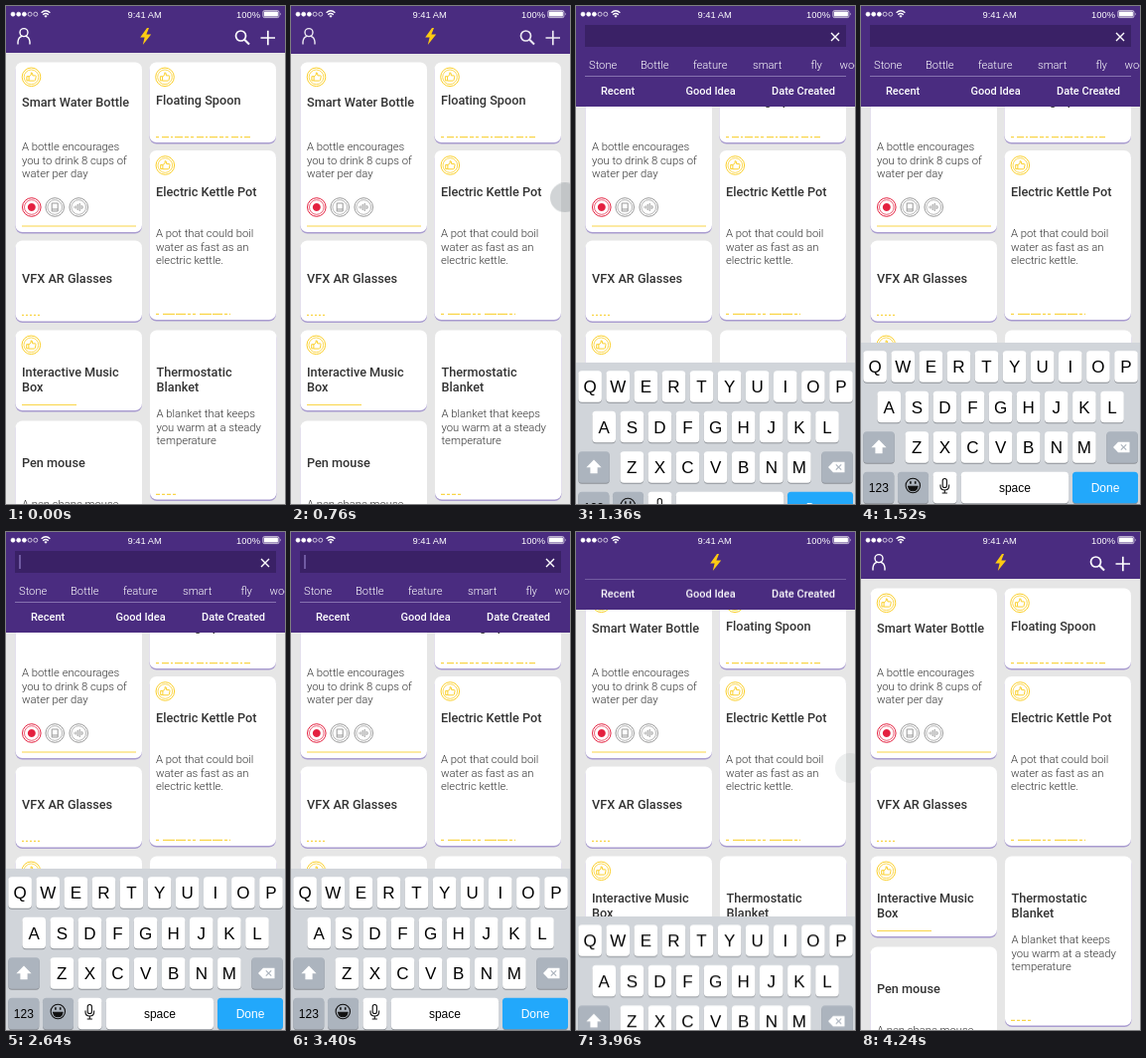
Animation, 281 px wide and 500 px high, one loop 4.48 s. Source, as an HTML page:

```html
<!DOCTYPE html>
<html lang="en">
<head>
<meta charset="utf-8">
<title>Pull-down search</title>
<style>
html, body { margin: 0; width: 100%; height: 100%; overflow: hidden; background: #e6e6e6; }
svg { display: block; width: 100%; height: 100%; }
text { font-family: Roboto, sans-serif; }
.title { font-size: 12.7px; font-weight: 500; fill: #333; }
.body { font-size: 11.25px; font-weight: 300; fill: #333; }
.tag { font-size: 11.2px; font-weight: 300; fill: #fff; }
.filter { font-size: 11px; font-weight: 500; fill: #fff; }
.sys, .sys text { font-family: "Liberation Sans", Arial, sans-serif; }
.status text { font-size: 9.4px; fill: #fff; }
.line { fill: none; stroke: #f9d548; stroke-width: 1.2; }
.icon { fill: none; stroke: #fff; stroke-width: 1.4; }

.drop, .keys, .icons, .caret, .touch, .dot { animation: 4480ms linear infinite; }
.drop { animation-name: drop; }
.keys { animation-name: keys; }
.icons { animation-name: icons; }
.caret { animation-name: caret; animation-timing-function: step-end; }
.touch { animation-name: swipe; }
.dot { animation-name: press; }

@keyframes drop {
  0%, 16.071% { transform: translateY(-54px); animation-timing-function: ease-in-out; }
  23.214% { transform: translateY(-10px); animation-timing-function: ease-out; }
  25%, 83.036% { transform: none; animation-timing-function: ease-in-out; }
  88.393% { transform: translateY(-23px); animation-timing-function: cubic-bezier(.2, .6, .35, 1); }
  94.643%, 100% { transform: translateY(-54px); }
}
@keyframes keys {
  0%, 26.786% { transform: translateY(163px); animation-timing-function: cubic-bezier(.215, .61, .355, 1); }
  33.929%, 83.036% { transform: none; animation-timing-function: ease-in-out; }
  88.393% { transform: translateY(47px); animation-timing-function: cubic-bezier(.2, .6, .35, 1); }
  94.643%, 100% { transform: translateY(163px); }
}
@keyframes icons {
  0%, 16.071% { opacity: 1; }
  23.214% { opacity: .18; }
  25%, 88.393% { opacity: 0; }
  94.643%, 100% { opacity: 1; }
}
@keyframes caret {
  0% { opacity: 0; }
  41.071% { opacity: 1; }
  50% { opacity: 0; }
  58.929% { opacity: 1; }
  67.857% { opacity: 0; }
  75.893% { opacity: 1; }
  79.464%, 100% { opacity: 0; }
}
@keyframes swipe {
  0%, 16.071% { transform: translateY(188px); animation-timing-function: ease-in-out; }
  23.214%, 50% { transform: translateY(320px); animation-timing-function: step-end; }
  50.01%, 83.036% { transform: translateY(307px); animation-timing-function: ease-in-out; }
  88.393%, 100% { transform: translateY(237px); }
}
@keyframes press {
  0%, 13.8% { opacity: 0; }
  16.071%, 23.214% { opacity: 1; }
  25%, 78.571% { opacity: 0; }
  82.143%, 86.607% { opacity: 1; }
  88.393% { opacity: .4; }
  89.286%, 100% { opacity: 0; }
}
</style>
</head>
<body>
<svg viewBox="0 0 281 500">
  <defs>
    <g id="like" fill="none" stroke="#fbd02c">
      <circle r="9.3"/>
      <circle r="7.3" stroke-width=".8"/>
      <path d="M-4.6-.6h2.2v4.2h-2.2zM-2.4-.4L-.2-2.2V-4.4q1.8-.4 1.6 3h2.8q.8.2.5 1.2L4 3.2q-.3.6-1 .6h-5.4" stroke-width="1"/>
    </g>
    <g id="ring" fill="none">
      <circle r="9.3"/>
      <circle r="7.3" stroke-width=".7"/>
    </g>
  </defs>

  <rect width="281" height="500" fill="#e6e6e6"/>
  <g id="cards"></g>

  <g class="drop">
    <rect y="-10" width="281" height="111" fill="#4a2c80"/>
    <g id="tags"></g>
    <path d="M9 70.5H272" stroke="#8672b0"/>
    <g id="filters"></g>
  </g>

  <rect width="281" height="47" fill="#4a2c80"/>
  <g class="icons icon">
    <circle cx="18" cy="26.6" r="4"/>
    <path d="M12 38.5V36q.4-4.6 4-5.6M24 38.5V36q-.4-4.6-4-5.6"/>
    <circle cx="236.5" cy="30" r="5" stroke-width="1.7"/>
    <path d="M240.2 33.7L245 38.5" stroke-width="2"/>
    <path d="M256.5 32H271M263.8 24.7V39.3" stroke-width="1.7"/>
  </g>
  <path d="M142 22L135.2 31.6H139.6L137.8 39L146.2 28.4H141.4L144 22Z" fill="#fdcb12"/>

  <g class="drop">
    <rect x="9" y="19" width="263" height="22" fill="#3a2166"/>
    <path class="icon" d="M257 27l8 8M265 27l-8 8" stroke-width="1.2"/>
    <path class="caret" d="M14 23V37" stroke="#8f7cc4" stroke-width="1.3"/>
  </g>

  <g class="status sys">
    <rect width="281" height="19" fill="#4a2c80"/>
    <g id="signal" stroke="#fff" stroke-width=".7"></g>
    <path class="icon" d="M35.6 6.7q4.4-3.8 8.8 0M37.2 8.7q2.8-2.4 5.6 0"/>
    <path d="M38.4 9.9q1.6-1.2 3.2 0L40 11.8z" fill="#fff"/>
    <text x="122.5" y="11.7">9:41 AM</text>
    <text x="232" y="11.7">100%</text>
    <rect x="258.9" y="4.6" width="16" height="7" rx="1.4" fill="none" stroke="#fff" stroke-width=".7"/>
    <rect x="259.9" y="5.6" width="14" height="5" rx=".6" fill="#fff"/>
    <path d="M276 6.8q1.3 1.3 0 2.6z" fill="#fff"/>
  </g>

  <g class="keys sys">
    <rect y="338" width="281" height="163" fill="#d1d5da"/>
    <g id="keys" text-anchor="middle"></g>
    <path d="M18 435.5l7.6 7.8h-4v6h-7.2v-6h-4z" fill="#fff"/>
    <path d="M254 443l5-5.2h11.5v10.4H259z" fill="#fff"/>
    <path d="M261.8 440.3l5.4 5.4M267.2 440.3l-5.4 5.4" stroke="#acb4be" stroke-width="1.2"/>
    <g fill="none" stroke="#111" stroke-width="1.1">
      <circle cx="52.3" cy="481.5" r="7.2"/>
      <path d="M47.6 482.3h9.4q-.8 4.4-4.7 4.4t-4.7-4.4z" fill="#111"/>
      <path d="M49.9 477.3v2.4M54.7 477.3v2.4" stroke-width="1.6"/>
      <rect x="82.2" y="474.5" width="4.2" height="9" rx="2.1"/>
      <path d="M80 480.5v1.5q0 4 4.3 4t4.3-4v-1.5M84.3 486v3M81.7 489h5.2"/>
    </g>
  </g>

  <g class="touch">
    <circle class="dot" cx="276" r="15" fill="rgba(145,152,158,.42)"/>
  </g>
</svg>
<script>
const ns = 'http://www.w3.org/2000/svg';
const at = id => document.getElementById(id);

function add(parent, name, attrs, text) {
  const el = document.createElementNS(ns, name);
  for (const key in attrs) el.setAttribute(key, attrs[key]);
  if (text) el.textContent = text;
  parent.append(el);
  return el;
}

const cards = at('cards');

function box(x, y, h) {
  add(cards, 'rect', { x, y: y + 1.6, width: 127.5, height: h, rx: 7, fill: '#a99cd0' });
  add(cards, 'rect', { x, y, width: 127.5, height: h, rx: 7, fill: '#fff' });
}
function lines(cls, x, y, step, rows) {
  rows.forEach((row, i) => add(cards, 'text', { class: cls, x, y: y + i * step }, row));
}
const title = (x, y, ...rows) => lines('title', x, y, 15.3, rows);
const body = (x, y, ...rows) => lines('body', x, y, 13.6, rows);
const like = (x, y) => add(cards, 'use', { href: '#like', x, y });
const rule = (x, y, w, dash = 'none') =>
  add(cards, 'path', { class: 'line', d: `M${x} ${y}h${w}`, 'stroke-dasharray': dash });

function badge(x, color, attrs) {
  const g = add(cards, 'g', { transform: `translate(${x} 202)`, stroke: color, fill: 'none' });
  add(g, 'use', { href: '#ring' });
  add(g, 'path', attrs);
}

box(9.5, 56.5, 170.5);
like(25.5, 71.3);
title(16, 101, 'Smart Water Bottle');
body(16, 145, 'A bottle encourages', 'you to drink 8 cups of', 'water per day');
badge(25.8, '#e4203f', { d: 'M0-4a4 4 0 1 0 .01 0z', fill: '#e4203f', stroke: 'none' });
badge(49.2, '#999', { d: 'M-3-4h6v8h-6zM-3 2h6' });
badge(73.2, '#999', { d: 'M-5 0h1M-3-1.5v3M-1-3v6M1-4v8M3-2v4M4 0h1' });
rule(16, 221, 115);

box(9.5, 235.5, 81);
title(16, 277.6, 'VFX AR Glasses');
rule(16, 310.3, 18, '2 2');

box(9.5, 325.5, 80.5);
like(25.3, 340.3);
title(16, 371.5, 'Interactive Music', 'Box');
rule(16, 400.5, 55);

box(9.5, 416.5, 100);
title(16, 462.6, 'Pen mouse');
body(16, 504, 'A pen shape mouse');

box(144.5, 56.5, 80.5);
like(160, 71.3);
title(151, 99, 'Floating Spoon');
rule(151, 131.6, 95, '3 3 7 2 2 2 8 2 4 2');

box(144.5, 145, 170);
like(160.3, 160);
title(151, 191.2, 'Electric Kettle Pot');
body(151, 232, 'A pot that could boil', 'water as fast as an', 'electric kettle.');
rule(151, 309.3, 75, '3 4 12 1 10 2 3 2');

box(145, 325.5, 170);
title(151.5, 371.5, 'Thermostatic', 'Blanket');
body(151.5, 413, 'A blanket that keeps', 'you warm at a steady', 'temperature');
rule(151, 490.3, 20, '4 2 3 2');

const row = (id, cls, y, items) =>
  items.forEach(([x, label]) => add(at(id), 'text', { class: cls, x, y }, label));
row('tags', 'tag', 63, [[13, 'Stone'], [65, 'Bottle'], [118, 'feature'], [178, 'smart'], [236.5, 'fly'], [265.5, 'wood']]);
row('filters', 'filter', 89, [[25, 'Recent'], [110.5, 'Good Idea'], [197, 'Date Created']]);

for (let i = 0; i < 5; i++)
  add(at('signal'), 'circle', { cx: 7 + i * 5.7, cy: 8.2, r: 2, fill: i < 3 ? '#fff' : 'none' });

function key(x, y, w, fill, label, size = 17, ink = '#000') {
  const k = at('keys');
  add(k, 'rect', { x, y: y + 1, width: w, height: 31.5, rx: 3.6, fill: '#8c9096' });
  add(k, 'rect', { x, y, width: w, height: 31.5, rx: 3.6, fill });
  if (label) add(k, 'text', { x: x + w / 2, y: y + 15.7 + size * .36, 'font-size': size, fill: ink }, label);
}
['QWERTYUIOP', 'ASDFGHJKL', 'ZXCVBNM'].forEach((letters, r) =>
  [...letters].forEach((c, i) =>
    key([2.3, 16.4, 44.5][r] + i * 28.1, 346.2 + r * 40.5, 23.6, '#fff', c)));
key(2.3, 427.2, 31.5, '#acb4be');
key(247.3, 427.2, 31.5, '#acb4be');
key(2.3, 467.7, 31, '#acb4be', '123', 12);
key(37, 467.7, 31, '#acb4be');
key(72.5, 467.7, 24, '#fff');
key(100.8, 467.7, 108.2, '#fff', 'space', 12);
key(213, 467.7, 66, '#22a8fb', 'Done', 12, '#fff');
</script>
</body>
</html>
```
